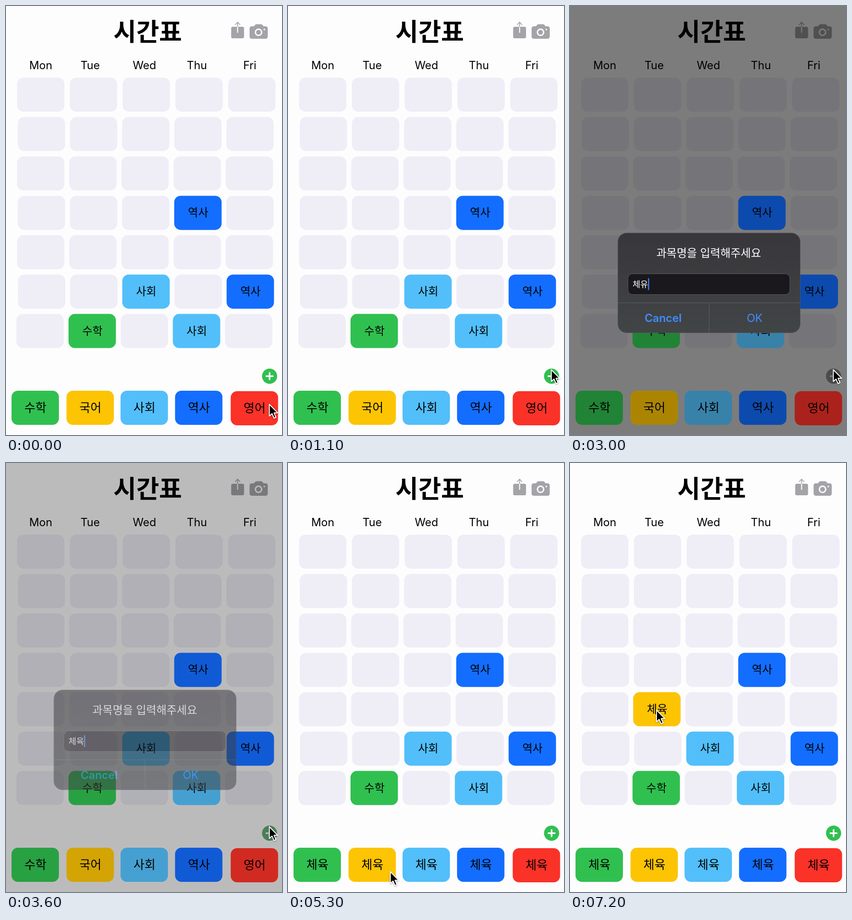
An HTML page that plays this animation: 600 by 930 pixels, repeating every 7.3 s.

```html
<!DOCTYPE html>
<html lang="ko">
<head>
<meta charset="utf-8">
<style>
html, body { margin: 0; width: 100%; height: 100%; overflow: hidden; background: #fefdfe; }
svg { display: block; width: 600px; height: 930px; }
text { font-family: Inter, "Noto Sans CJK KR", "Noto Sans CJK", sans-serif; text-anchor: middle; }
.ko { font-family: "Noto Sans CJK KR", "Noto Sans CJK", sans-serif; }
.cell { font-size: 24px; }
.card { font-size: 26px; }
.day { font-size: 24px; }
.start { text-anchor: start; font-size: 18.3px; }
</style>
</head>
<body>
<svg viewBox="0 0 600 930">
  <g id="base">
    <rect width="600" height="930" fill="#fefdfe"/>
    <g id="cells" fill="#efeef7"></g>
    <g fill="#a4a3a7">
      <rect x="489.5" y="45" width="28" height="25" rx="3.5"/>
      <path d="M498 41l5.5-6 5.5 6M503.500 36v9" fill="none" stroke="#a4a3a7" stroke-width="1.800"/>
      <path d="M503.500 45v13" stroke="#fefdfe" stroke-width="2.200"/>
      <path d="M535 44h4l3-3.500q1-1 3-1h9q2 0 3 1l3 3.500h4q5 0 5 5v17q0 5-5 5h-29q-5.500 0-5.500-5v-17q0-5 5.500-5z"/>
      <circle cx="549" cy="57" r="6.800" stroke="#fefdfe" stroke-width="3"/>
      <circle cx="561.500" cy="51" r="1.800" fill="#fefdfe"/>
    </g>
    <text class="ko" x="308" y="75.500" font-size="54" font-weight="700">시간표</text>
    <g id="days"></g>
  </g>
  <g id="plus">
    <circle cx="573" cy="802.500" r="16.500" fill="#30c050"/>
    <path d="M566 802.500h14M573 795.500v14" stroke="#fefdfe" stroke-width="3.500" stroke-linecap="round"/>
  </g>
  <g id="tiles"></g>
  <g id="dialog">
    <linearGradient id="glass" x2="0" y2="1">
      <stop stop-color="#38363a"/><stop offset="1" stop-color="#414546"/>
    </linearGradient>
    <rect x="104" y="492" width="396.500" height="216.500" rx="19" fill="url(#glass)" stroke="#5a595d" stroke-width=".8"/>
    <text class="ko" x="301.500" y="544" font-size="24" font-weight="500" fill="#fff">과목명을 입력해주세요</text>
    <rect x="126" y="580.500" width="352" height="45" rx="10" fill="#1a181c" stroke="#5b5a5e"/>
    <path d="M104 643.500h396.500M302.500 643.500v65" stroke="#5f6064"/>
    <g font-size="24" fill="#3f8cff">
      <text x="202.500" y="685" font-weight="600">Cancel</text>
      <text x="401.500" y="685">OK</text>
    </g>
    <text id="field" class="ko start" x="136" y="610"></text>
    <rect id="caret" y="590" width="2.500" height="26" rx="1" fill="#3f7cf0"/>
  </g>
  <g id="drag"></g>
  <path id="cursor" d="M0 0V25.500L5.800 20.200 10.200 30 14.400 28 10.200 18.600H18.200Z" stroke="#fff" stroke-width="2"
    stroke-linejoin="round" style="filter:drop-shadow(0 1px 1.500px #0006)"/>
</svg>
<script>
const LOOP = 7300, STEP = 100;
const RENAME = 3900, LIFT = 5700, DROP = 6800;
const GREEN = '#30c050', YELLOW = '#fcc403', SKY = '#52bffa', BLUE = '#136dff', RED = '#fa3228';
const $ = id => document.getElementById(id);

const rowX = [24, 25.5, 24, 25.5, 24, 26, 22.5];
const cellX = (r, c) => rowX[r] + c * (r ? 113.4 : 114.75);
const cellY = r => 155.2 + r * 85.4;
const box = (x, y, fill = '') =>
  `<rect x="${x}" y="${y}" width="103" height="74" rx="14" ${fill && `fill="${fill}"`}/>`;
const tile = (x, y, fill, name, kind) => box(x, y, fill) +
  `<text class="ko ${kind}" x="${x + 52}" y="${y + (kind == 'card' ? 45.5 : 45)}">${name}</text>`;

const placed = [[3, 3, BLUE, '역사'], [5, 2, SKY, '사회'], [5, 4, BLUE, '역사'], [6, 1, GREEN, '수학'], [6, 3, SKY, '사회']];
const cards = [[12, GREEN, '수학'], [131.5, YELLOW, '국어'], [249, SKY, '사회'], [367.5, BLUE, '역사'], [488.5, RED, '영어']];
const typed = [[2400, 'ㅊ'], [2600, '체'], [2800, '쳉'], [3000, '체유'], [3200, '체육']];
// time, x, y of the pointer tip
const path = [[0, 572.5, 863.5], [200, 572.5, 863.5], [500, 580, 826], [800, 572.5, 788.5], [4200, 572.5, 788.5],
  [4900, 250, 899], [5300, 222.5, 886], [5600, 187, 875], [5800, 187, 875], [6600, 188, 535.5]];

$('cells').innerHTML = rowX.map((_, r) => [0, 1, 2, 3, 4].map(c => box(cellX(r, c), cellY(r))).join('')).join('');
$('days').innerHTML = [['Mon', 75.5], ['Tue', 183], ['Wed', 301], ['Thu', 415], ['Fri', 530]]
  .map(([d, x]) => `<text class="day" x="${x}" y="137">${d}</text>`).join('');

const progress = (t, from, length) => Math.min(1, Math.max(0, (t - from) / length));
const easeOut = p => 1 - (1 - p) ** 3;

function pointer(t) {
  const i = path.findIndex(k => k[0] > t);
  if (i < 0) return path.at(-1).slice(1);
  const [a, b] = [path[i - 1], path[i]];
  const p = progress(t, a[0], b[0] - a[0]), s = p * p * (3 - 2 * p);
  return [a[1] + (b[1] - a[1]) * s, a[2] + (b[2] - a[2]) * s];
}

function draw(t) {
  const shown = easeOut(progress(t, 1100, 400));
  const dim = shown - easeOut(progress(t, 3500, 500));
  $('base').style.filter = `brightness(${1 - 0.51 * dim})`;
  $('plus').style.filter = `saturate(${1 - dim}) brightness(${1 - 0.51 * dim})`;
  $('tiles').style.filter = `brightness(${1 - 0.32 * dim})`;

  const scale = 1.2 - 0.2 * shown;
  $('dialog').setAttribute('opacity', dim);
  $('dialog').setAttribute('transform', `translate(302 600) scale(${scale}) translate(-302 -600)`);
  const text = typed.findLast(k => k[0] <= t)?.[1];
  $('field').textContent = text || '여기에 입력해주세요.';
  $('field').setAttribute('fill', text ? '#fff' : '#5d5c60');
  $('caret').setAttribute('x', text ? 136 + $('field').getComputedTextLength() : 136);
  $('caret').setAttribute('opacity', text || (t >= 1700 && t < 2200) ? 1 : 0);

  const filled = t >= DROP ? [...placed, [4, 1, YELLOW, '체육']] : placed;
  $('tiles').innerHTML = filled.map(([r, c, fill, name]) => tile(cellX(r, c), cellY(r), fill, name, 'cell')).join('') +
    cards.map(([x, fill, name], i) => tile(x, i == 4 ? 835 : 834, fill, t >= RENAME ? '체육' : name, 'card')).join('');

  const [x, y] = pointer(t);
  $('cursor').setAttribute('transform', `translate(${x} ${y})`);
  $('drag').innerHTML = t >= LIFT && t < DROP ? tile(x - 55.5, y - 41, YELLOW, '체육', 'card') : '';
  $('drag').setAttribute('opacity', 0.85);
}

function tick(now) {
  const t = now % LOOP;
  draw(t - t % STEP);
  requestAnimationFrame(tick);
}
requestAnimationFrame(tick);
</script>
</body>
</html>
```
